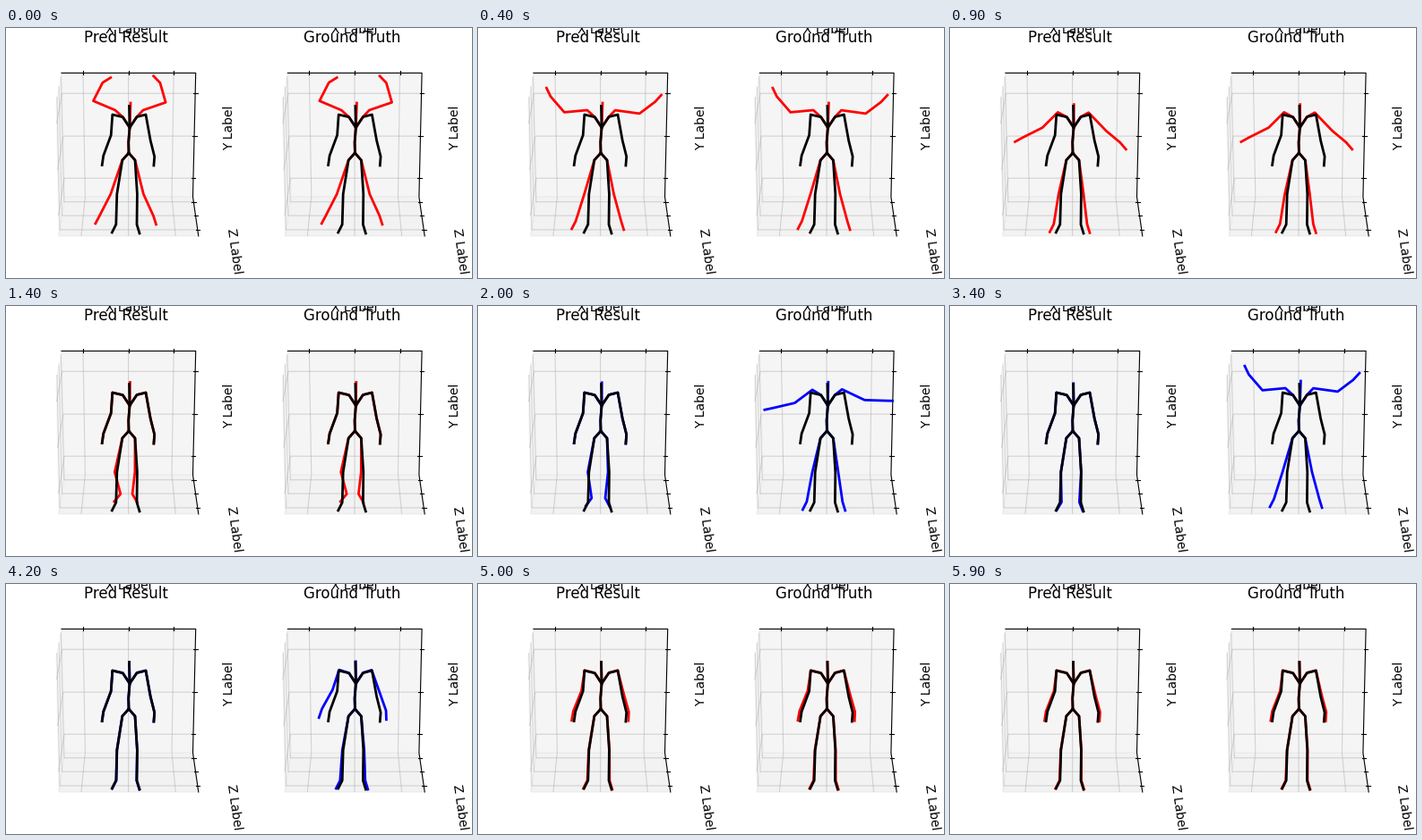
Animation of 520x280 px, one loop 6 s. Source, as a matplotlib script:

```python
import numpy as np
import matplotlib.pyplot as plt
from matplotlib.animation import FuncAnimation
from matplotlib.collections import LineCollection

W, H, DPI = 520, 280, 100
FRAMES, STEP = 60, 100
SHIFT = 252.4              # distance between the two panels
BLUE_FROM, BLUE_TO = 1500, 4500
JACK = 3000                # duration of one jumping jack, ms

plt.rcParams["font.family"] = "DejaVu Sans"
fig = plt.figure(figsize=(W / DPI, H / DPI), dpi=DPI, facecolor="white")
ax = fig.add_axes([0, 0, 1, 1])
ax.set_xlim(0, W)
ax.set_ylim(H, 0)
ax.axis("off")


def mix(a, b, t):
    return a + (b - a) * t


# ---- the box seen in perspective -------------------------------------
BACK = np.array([(62, 50.4), (211.7, 50.4), (208.5, 189), (65.5, 189)])
FRONT = np.array([(56, 82), (218, 82), (214.8, 233), (59, 233)])
X_TICKS = (0.16, 0.498, 0.836)
Y_TICKS = (0.165, 0.51, 0.85)
Z_TICKS = (0.13, 0.48, 0.84)


def draw_box(dx):
    move = np.array([dx, 0])
    back, front = BACK + move, FRONT + move
    tl, tr, br, bl = back
    ftl, _, fbr, fbl = front

    panes = [((tl, bl, fbl, ftl), 0.95), ((bl, br, fbr, fbl), 0.90),
             ((tl, tr, br, bl), 0.925)]
    for corners, grey in panes:
        ax.add_patch(plt.Polygon(corners, color=(grey,) * 3, alpha=0.5,
                                 lw=1, zorder=1))

    grid = []
    for t in X_TICKS:
        grid.append([mix(tl, tr, t), mix(bl, br, t), mix(fbl, fbr, t)])
    for t in Y_TICKS:
        grid.append([mix(tr, br, t), mix(tl, bl, t), mix(ftl, fbl, t)])
    for t in Z_TICKS:
        grid.append([mix(br, fbr, t), mix(bl, fbl, t), mix(tl, ftl, t)])
    ax.add_collection(LineCollection(grid, colors="#b0b0b0", linewidths=0.8,
                                     alpha=0.5, zorder=2))

    ax.plot(*np.array([tl, tr, br, fbr]).T, color="black", lw=0.8, zorder=3)
    for t in X_TICKS:
        x, y = mix(tl, tr, t)
        ax.plot([x, x], [y - 2.5, y + 2], color="black", lw=0.8, zorder=3)
    for a, b, ticks in ((tr, br, Y_TICKS), (br, fbr, Z_TICKS)):
        for t in ticks:
            x, y = mix(a, b, t)
            ax.plot([x - 2, x + 2.5], [y, y], color="black", lw=0.8, zorder=3)


def draw_labels(dx, title):
    def label(x, y, text, size=10, angle=0):
        ax.text(x + dx, y, text, fontsize=size, rotation=angle, ha="center",
                va="baseline", rotation_mode="anchor", zorder=9)

    label(134.2, 16, title, 12)
    label(136.8, 6, "X Label")
    label(253, 111.5, "Y Label", angle=90)
    label(250.4, 250.5, "Z Label", angle=-82)


# ---- skeleton at rest, a few key points -------------------------------
HEAD, NECK = np.array([137.5, 87.5]), (138, 111.5)
WAIST, PELVIS = (136.7, 128), (137, 140)
COLLARS = (130.3, 99.7), (146, 99.5)
HIPS = (129.8, 148), (144, 148)
ARMS = (np.array([(118.8, 97), (117.2, 120), (108.7, 143), (107.2, 153.5)]),
        np.array([(156, 97), (161.2, 126), (165.7, 144), (164.9, 154)]))
LEGS = (np.array([(123.8, 186), (122.8, 220), (118.3, 229)]),
        np.array([(146.4, 186), (146, 220), (149, 230)]))
SIDES = (-1, 1)

# Upper arm, forearm and hand when fully raised.
TOP_ANGLE = np.radians([113, 207, 238])   # outward from straight down
TOP_LENGTH = np.array([26.5, 23, 10.5])


def arm(rest, side, lift):
    """Swing each segment from its resting angle toward the raised one."""
    bones = np.diff(rest, axis=0)
    angle = np.arctan2(side * bones[:, 0], bones[:, 1])
    length = np.hypot(*bones.T)
    angle = mix(angle, TOP_ANGLE, lift ** np.array([1, 1.5, 1.5]))
    length = mix(length, TOP_LENGTH, lift)
    steps = np.column_stack([side * np.sin(angle), np.cos(angle)])
    shoulder = rest[0] + min(1, 1.4 * lift) * np.array([-3 * side, -5])
    return np.vstack([shoulder, shoulder + np.cumsum(steps * length[:, None],
                                                     axis=0)])


def leg(rest, side, lift, tuck):
    """Knee, ankle and toe: spread outward with lift, drawn in with tuck."""
    out = side * (lift * np.array([7, 18.5, 18.5])
                  - tuck * np.array([0, 5, 2.5]))
    out[0] -= 2.5 * tuck ** 3
    up = (lift ** 3 + tuck ** 3) * np.array([0, 9.5, 10])
    return rest + np.column_stack([out, -up])


def chains(lifts, tuck):
    lift = lifts[0]
    rise = max(min(1, 1.4 * lift), 0.6 * tuck)
    head = HEAD + rise * np.array([1.5, -3.5])
    result = [[head, NECK, WAIST, PELVIS]]
    for i, side in enumerate(SIDES):
        result.append([NECK, COLLARS[i], *arm(ARMS[i], side, lifts[i])])
        result.append([PELVIS, HIPS[i], *leg(LEGS[i], side, lift, tuck)])
    return result


# ---- motion: arm lifts (left, right) and leg tuck at a time -----------
LIFT_TIMES = (0, 400, 700, 1200, 1400, 1650, 2100, 2600, JACK)
LIFT_KEYS = (1, 0.74, 0.54, 0.13, 0, 0, 0.58, 0.85, 1)
LEAD = 60                  # the right arm runs slightly ahead


def jack(ms):
    lifts = [np.interp((ms + lead) % JACK, LIFT_TIMES, LIFT_KEYS)
             for lead in (0, LEAD)]
    tuck = np.clip(2 - abs(ms % JACK - 1430) / 110, 0, 1)
    return lifts, tuck


def settle(ms):
    return (0, 0), 1 - (ms - 1400) / JACK


def idle(ms):
    sway = 0.025 + 0.02 * np.sin(np.pi * (ms - BLUE_TO) / 1500)
    return (sway, sway), 0


class Skeleton:
    def __init__(self, dx, color, zorder):
        self.dx = dx
        self.lines = [ax.plot([], [], color=color, lw=2, zorder=zorder)[0]
                      for _ in range(5)]

    def show(self, lifts, tuck):
        for line, chain in zip(self.lines, chains(lifts, tuck)):
            x, y = np.array(chain).T
            line.set_data(x + self.dx, y)

    def paint(self, color):
        for line in self.lines:
            line.set_color(color)


movers = []
for dx, title in ((0, "Pred Result"), (SHIFT, "Ground Truth")):
    draw_box(dx)
    draw_labels(dx, title)
    movers.append(Skeleton(dx, "red", 5))
    Skeleton(dx, "black", 6).show((0, 0), 0)


def update(frame):
    ms = frame * STEP
    if ms < BLUE_FROM:
        motions, color = (jack, jack), "red"
    elif ms < BLUE_TO:
        motions, color = (settle, jack), "blue"
    else:
        motions, color = (idle, idle), "red"
    for mover, motion in zip(movers, motions):
        mover.show(*motion(ms))
        mover.paint(color)
    return [line for mover in movers for line in mover.lines]


anim = FuncAnimation(fig, update, frames=FRAMES, interval=STEP, repeat=True,
                     repeat_delay=0, blit=False)
plt.show()
```
